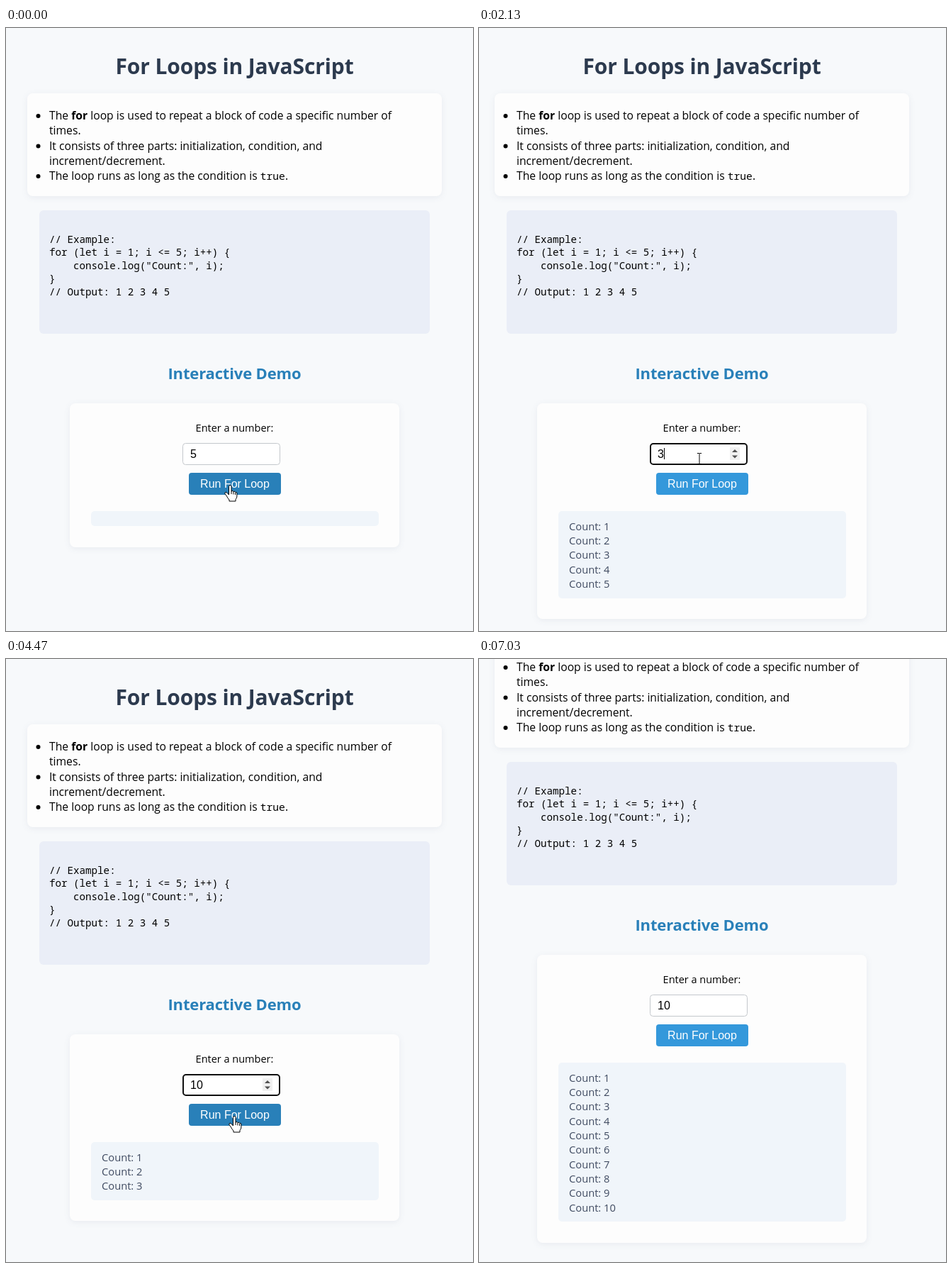
Animation of 659 by 850 pixels, one loop 7.1 s. Source, as an HTML page:

```html
<!DOCTYPE html>
<html lang="en">
<head>
<meta charset="utf-8">
<title>For Loops in JavaScript</title>
<style>
  html, body { margin: 0; width: 100%; height: 100%; overflow: hidden; background: #f7f9fb; }
  svg { display: block; width: 659px; height: 850px; }
  text { font: 15.7px "Open Sans", "Noto Sans", sans-serif; fill: #000; white-space: pre; }
  .title { font-size: 30px; font-weight: 700; letter-spacing: -.12px; fill: #2c3a4e; }
  .sub { font-size: 22px; font-weight: 700; letter-spacing: -.15px; fill: #2980b9; }
  .mid { text-anchor: middle; }
  .b { font-weight: 700; }
  .mono { font: 14.66px "Noto Sans Mono", "DejaVu Sans Mono", monospace; }
  .code { font: 14.2px "Noto Sans Mono", "DejaVu Sans Mono", monospace; }
  .label { font-size: 14.5px; }
  .ui { font: 16px "Liberation Sans", Arial, sans-serif; }
  .count { font-size: 14.7px; fill: #3f4a60; }
  .card { fill: #fdfdfd; filter: drop-shadow(0 2px 4px rgba(40, 60, 100, .07)); }
</style>
</head>
<body>
<svg viewBox="0 0 659 850">
  <g id="page">
    <text class="title mid" x="322.5" y="65">For Loops in JavaScript</text>

    <rect class="card" x="30" y="92" width="585" height="145" rx="8"/>
    <circle cx="45.5" cy="124" r="3"/>
    <circle cx="45.5" cy="166.5" r="3"/>
    <circle cx="45.5" cy="209" r="3"/>
    <text x="61" y="129">The <tspan class="b">for</tspan> loop is used to repeat a block of code a specific number of</text>
    <text x="61" y="150">times.</text>
    <text x="61" y="172">It consists of three parts: initialization, condition, and</text>
    <text x="61" y="193">increment/decrement.</text>
    <text x="61" y="214">The loop runs as long as the condition is <tspan class="mono">true</tspan>.</text>

    <rect x="47" y="257" width="551" height="174" rx="6" fill="#eaeef7"/>
    <g id="code"></g>

    <text class="sub mid" x="322.5" y="495">Interactive Demo</text>
    <rect class="card" id="demo" x="90" y="529" width="465" rx="8"/>
    <text class="label mid" x="322.5" y="569">Enter a number:</text>

    <rect id="box" rx="4" fill="#fff"/>
    <text class="ui" id="value" x="260" y="606"></text>
    <g id="spin">
      <rect x="362" y="591" width="14" height="18" fill="#f0f0f0"/>
      <path d="M365 598l4-4 4 4zM365 602.500l4 4 4-4z" fill="#505050"/>
    </g>
    <rect id="caret" y="592" width="1" height="16"/>

    <rect id="button" x="258" y="627" width="130" height="31" rx="4"/>
    <text class="ui mid" x="323" y="648" style="fill:#fff">Run For Loop</text>

    <rect id="out" x="120" y="681" width="406" rx="5" fill="#f0f5fa"/>
    <g id="counts"></g>
  </g>

  <g id="cursor">
    <path id="hand" fill="#fff" stroke="#000" stroke-linejoin="round"
      d="M-1.500 1.500q0-2 1.800-2t1.700 2V8q2.400-1.400 2.900 .6 2.400-.9 2.700 .7 2.300-.5 2.300 1.700V15q0 2.500-1.900 4.500V22H-1V20Q-3 18-4.500 15L-7 11.500Q-7.500 9.500-5.800 9.300-4.500 9.300-1.500 13ZM2 8v4M4.900 9v3.500M7.600 10v3"/>
    <path id="beam" fill="none" stroke="#000" d="M-3-7.500h2.500l.5.500.5-.5H3M0-7V7M-3 7.500h2.500L0 7l.5.500H3"/>
    <path id="arrow" fill="#fff" stroke="#000" d="M.5.500V16.500l3.700-3.500 2.500 5.700 2.300-1-2.500-5.500h5Z"/>
  </g>
</svg>
<script>
const LOOP = 7100;
const $ = id => document.getElementById(id);

function setAttrs(el, attrs) {
  for (const name in attrs) el.setAttribute(name, attrs[name]);
}

function addLines(parent, lines, cls, x, y, pitch) {
  return lines.map((line, i) => {
    const el = document.createElementNS("http://www.w3.org/2000/svg", "text");
    setAttrs(el, { class: cls, x, y: y + i * pitch });
    el.textContent = line;
    return parent.appendChild(el);
  });
}

const ROW = 20.33;
addLines($("code"), [
  "// Example:",
  "for (let i = 1; i <= 5; i++) {",
  '    console.log("Count:", i);',
  "}",
  "// Output: 1 2 3 4 5"
], "code", 61, 303, 18.4);
const counts = addLines($("counts"), Array.from({ length: 10 }, (_, i) => "Count: " + (i + 1)),
  "count", 135, 707.7, ROW);

// Each entry is [time, value].
const typed = [[0, "5"], [1250, ""], [1750, "3"], [3250, ""], [3430, "1"], [3600, "10"]];
const printed = [[0, 0], [100, 5], [2640, 3], [4660, 10]];
const focused = [[0, false], [620, true], [2560, false], [3000, true], [4600, false]];
const hovered = [[-500, 1], [280, 0], [2290, 1], [2760, 0], [4130, 1], [5965, 0]];

// Pointer path: [time, x, y].
const path = [
  [0, 316, 645], [180, 316, 645], [560, 314, 603], [830, 313, 604.5], [2130, 311, 606.5],
  [2420, 316, 645], [2680, 317, 645], [2960, 296, 599], [3200, 292, 596], [3730, 290.5, 588],
  [3950, 293, 592], [4300, 322, 645], [5870, 322, 645], [5960, 324, 641], [6020, 325, 641],
  [6300, 420, 600], [6650, 465, 400], [6990, 450, -30], [7100, 450, -30]
];

const last = (steps, t) => steps.filter(s => s[0] <= t).pop();
const clamp = v => Math.min(1, Math.max(0, v));
const ease = v => v * v * (3 - 2 * v);
const show = (el, on) => el.style.display = on ? "" : "none";
const within = (x, y, l, t, w, h) => x >= l && x < l + w && y >= t && y < t + h;

function pointer(t) {
  const i = Math.max(1, path.findIndex(p => p[0] > t));
  const [a, b] = [path[i - 1], path[i]];
  const k = ease(clamp((t - a[0]) / (b[0] - a[0])));
  return [a[1] + (b[1] - a[1]) * k, a[2] + (b[2] - a[2]) * k];
}

function scrollTop(t) {
  if (t < 4930) return 0;
  return Math.round(3 + 109 * ease(clamp((t - 5880) / 75)));
}

function buttonColor(t) {
  const [start, on] = last(hovered, t);
  const k = clamp((t - start) / 200);
  const mix = on ? k : 1 - k;
  const rgb = [[52, 41], [152, 128], [219, 185]].map(([a, b]) => Math.round(a + (b - a) * mix));
  return `rgb(${rgb})`;
}

// The border lies wholly inside the input's outer edge.
function drawBox(focus) {
  const line = focus ? 2 : 1;
  setAttrs($("box"), {
    x: 249 + line / 2, y: 585 + line / 2, width: 138 - line, height: 31 - line,
    stroke: focus ? "#101010" : "#c4c8cc", "stroke-width": line
  });
}

function draw(t) {
  const n = last(printed, t)[1];
  const height = 21 + n * ROW;
  const cardBottom = 681 + height + 29.5;
  const shift = cardBottom + 27 > 850 ? -8 : 0; // room taken by the scrollbar
  const top = scrollTop(t);
  $("page").setAttribute("transform", `translate(${shift} ${-top})`);
  $("out").setAttribute("height", Math.round(height));
  $("demo").setAttribute("height", Math.round(cardBottom - 529));
  counts.forEach((el, i) => show(el, i < n));

  const [x, y] = pointer(t);
  const px = x - shift, py = y + top;
  const overButton = within(px, py, 258, 627, 130, 31);
  const overInput = within(px, py, 249, 585, 138, 31);
  $("cursor").setAttribute("transform", `translate(${Math.round(x)} ${Math.round(y)})`);
  show($("hand"), overButton);
  show($("beam"), overInput);
  show($("arrow"), !overButton && !overInput);

  const [focusTime, focus] = last(focused, t);
  const [keyTime, value] = last(typed, t);
  $("value").textContent = value;
  drawBox(focus);
  show($("spin"), focus || overInput);
  $("caret").setAttribute("x", 260 + Math.round(value.length * 8.9));
  show($("caret"), focus && (t - Math.max(focusTime, keyTime)) % 1000 < 500);
  $("button").setAttribute("fill", buttonColor(t));
}

const start = performance.now();
function tick() {
  draw((performance.now() - start) % LOOP);
  requestAnimationFrame(tick);
}
tick();
</script>
</body>
</html>
```
